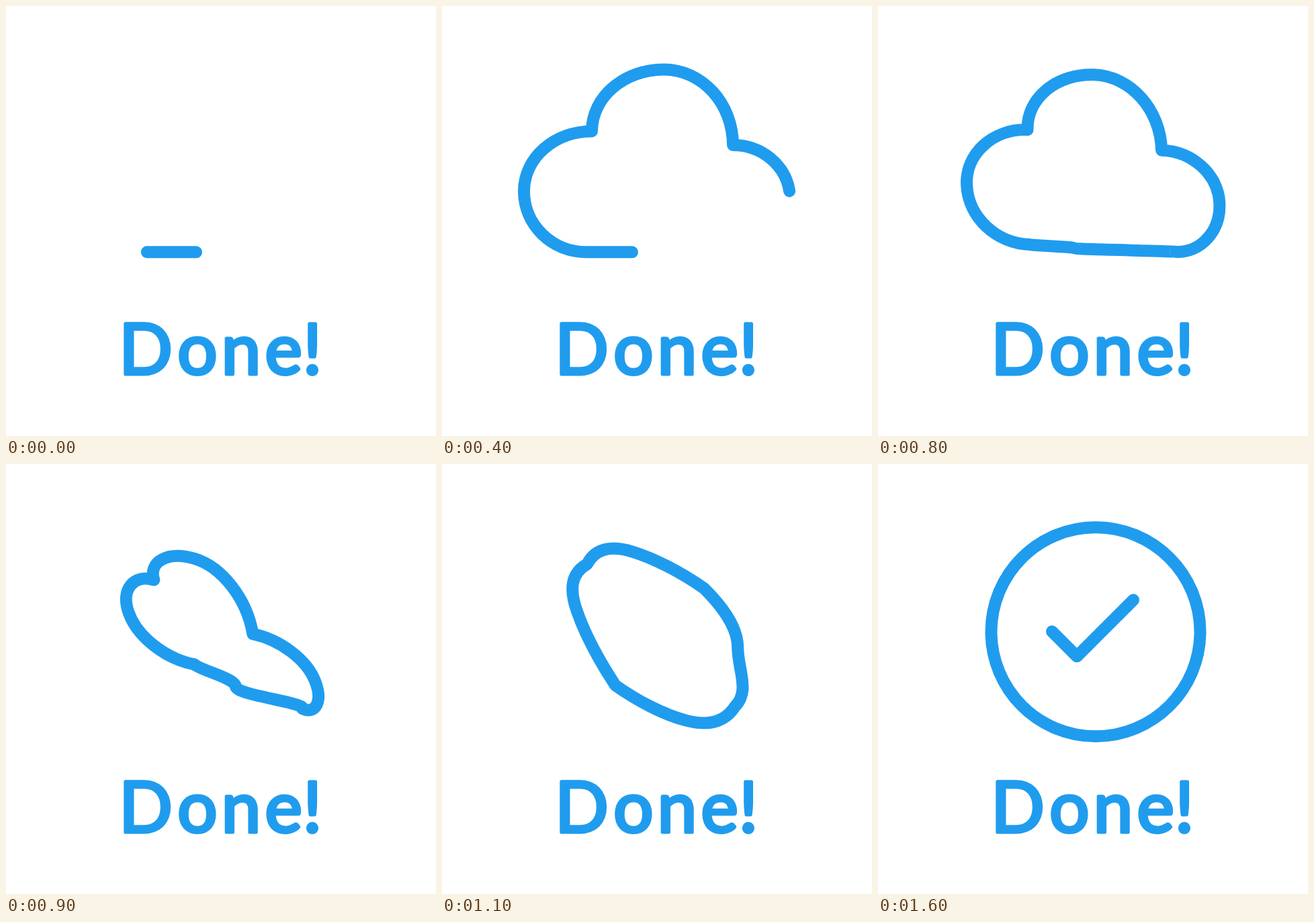
Write an HTML page that moves like this. It is 640x640 px and loops after 2.4 s.

```html
<!DOCTYPE html>
<html lang="en">
<head>
<meta charset="utf-8">
<title>Done</title>
<style>
  html, body { margin: 0; height: 100%; overflow: hidden; background: #fff; }
  svg { display: block; width: 100vw; height: 100vh; }
  path { fill: none; stroke-width: 18; }
  svg { stroke: #209cee; stroke-linecap: round; stroke-linejoin: round; }
  text { font: 400 104.5px Lato, "Open Sans", sans-serif; fill: #209cee; stroke-width: 5; text-anchor: middle; }
</style>
</head>
<body>
<svg viewBox="0 0 640 640">
  <path id="outline" pathLength="1"/>
  <path id="tick" pathLength="1" d="M259 249.3L296 286.3L380 202.3"/>
  <text x="208 285 350 413 456" y="547.6">Done!</text>
</svg>
<script>
const LOOP = 2400, STEP = 100;
const outline = document.getElementById('outline');
const tick = document.getElementById('tick');

// Each row: anchor x, y, then the corner that bends the curve to the next anchor.
// Rows without a corner start a straight line.
const cloud = [
  [283, 366.3],
  [215, 366.3, 122, 366.3],
  [122, 275.5, 122, 186.5],
  [223, 186.5, 223, 94.5],
  [330, 94.5, 433, 94.5],
  [433, 207, 518, 207],
  [518, 287, 518, 366.3],
  [444, 366.3]
];

const clamp = v => Math.min(1, Math.max(0, v));
const mix = (a, b, p) => a.map((v, i) => v + (b[i] - v) * p);

// Control points and end point of one curve, as six numbers.
const curve = (from, corner, to, pull) =>
  [...mix(from, corner, pull), ...mix(to, corner, pull), ...to];

function polar(turn, radius) {
  const angle = turn * Math.PI / 4;
  return [324 + radius * Math.cos(angle), 249.8 - radius * Math.sin(angle)];
}

const anchor = i => cloud[i % 8].slice(0, 2);
const cloudCurves = cloud.map((row, i) => {
  const round = row.length > 2;
  return curve(anchor(i), round ? row.slice(2) : anchor(i), anchor(i + 1), round ? 0.5523 : 0);
});

const RADIUS = 155.5;
const circleCurves = cloud.map((_, i) =>
  curve(polar(i, RADIUS), polar(i + 0.5, RADIUS / Math.cos(Math.PI / 8)), polar(i + 1, RADIUS), 0.64));

function morph(p) {
  const start = mix(anchor(0), polar(0, RADIUS), p);
  return 'M' + start + cloudCurves.map((c, i) => 'C' + mix(c, circleCurves[i], p)).join('') + 'Z';
}

function reveal(path, p) {
  path.style.visibility = p > 0 ? 'visible' : 'hidden';
  path.setAttribute('stroke-dasharray', p < 1 ? p + ' 2' : 'none');
}

function draw() {
  const t = Math.floor(performance.now() % LOOP / STEP) * STEP;
  outline.setAttribute('d', morph(clamp((t - 780) / 400)));
  reveal(outline, clamp((t + 40) / 600));
  reveal(tick, t < 1200 ? 0 : clamp((t - 1140) / 460) ** 1.13);
  requestAnimationFrame(draw);
}
draw();
</script>
</body>
</html>
```
